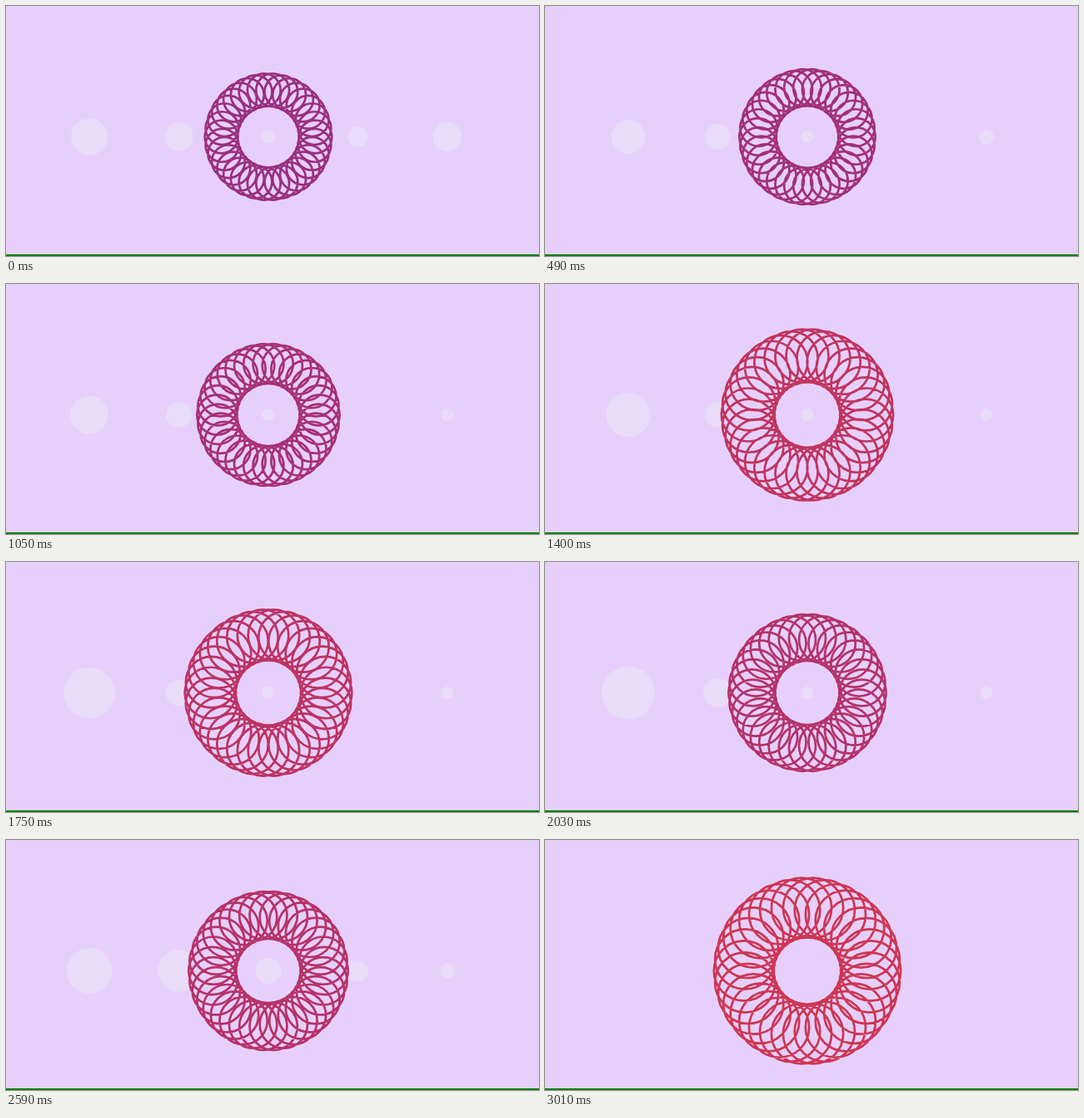
Recreate the animation shown at these times as an HTML page with a canvas. Size 640 by 301 pixels, loop 3.08 s.

```html
<!DOCTYPE html>
<html lang="en">
<head>
<meta charset="utf-8">
<title>Spirograph pulse</title>
<style>
  html, body { margin: 0; width: 100%; height: 100%; overflow: hidden; background: #e6d0fb; }
  canvas { display: block; width: 640px; height: 301px; }
</style>
</head>
<body>
<canvas id="stage" width="640" height="301"></canvas>
<script>
const ctx = document.getElementById('stage').getContext('2d');
const LOOP = 3080, STEP = 70, BEAT = 560, DOTS_END = 3010;
const CX = 315, CY = 157.5, RINGS = 34;
const BG = '#e6d0fb';

// each dot swells once per loop
const dots = [
  { base: 20, rise: 12, peak: 2020, width: 800 },
  { base: 15.2, rise: 10, peak: 2550, width: 420 },
  { base: 7.5, rise: 8.5, peak: 2650, width: 250 },
  { base: 1, rise: 22, peak: 2830, width: 300 },
  { base: 7.5, rise: 10, peak: 0, width: 350 }
];

const mix = (a, b, k) => a + (b - a) * k;

function dotRadius({ base, rise, peak, width }, t) {
  const gap = Math.abs(t - peak);
  const d = Math.min(gap, LOOP - gap) / width;
  return base + rise * Math.exp(-d * d);
}

// a slow swell with a bump on every beat
function ringSize(t) {
  const swell = 16 * (1 - Math.exp(-t / 1200));
  const phase = Math.min(1, (t % BEAT) / 380);
  return 77.5 + swell + 21.5 * Math.sin(Math.PI * phase);
}

function circle(x, y, r) {
  ctx.moveTo(x + r, y);
  ctx.arc(x, y, r, 0, Math.PI * 2);
}

function drawDots(t) {
  ctx.fillStyle = '#e9dcf9';
  ctx.beginPath();
  dots.forEach((dot, i) => circle(100 + i * 107.5, CY, dotRadius(dot, t)));
  ctx.fill();
}

function drawRings(size) {
  const k = (size - 77.5) / 36;
  const outer = size - 1.2, inner = mix(36.5, 40, k);
  const orbit = (outer + inner) / 2, r = (outer - inner) / 2;

  // the band hides the dots behind it
  ctx.fillStyle = BG;
  ctx.beginPath();
  circle(CX, CY, outer);
  circle(CX, CY, inner);
  ctx.fill('evenodd');

  ctx.strokeStyle = `rgb(${mix(154, 205, k)}, ${mix(46, 54, k)}, ${mix(128, 84, k)})`;
  ctx.lineWidth = 2.7;
  ctx.beginPath();
  for (let i = 0; i < RINGS; i++) {
    const a = i / RINGS * Math.PI * 2;
    circle(CX + orbit * Math.cos(a), CY + orbit * Math.sin(a), r);
  }
  ctx.stroke();
}

function draw(now) {
  const t = Math.floor((now % LOOP) / STEP) * STEP;
  ctx.fillStyle = BG;
  ctx.fillRect(0, 0, 640, 301);
  if (t < DOTS_END) drawDots(t);
  drawRings(ringSize(t));
  ctx.fillStyle = '#008000';
  ctx.fillRect(0, 299, 640, 2);
}

let start;
function tick(now) {
  start ??= now;
  draw(Math.max(0, now - start));
  requestAnimationFrame(tick);
}
draw(0);
requestAnimationFrame(tick);
</script>
</body>
</html>
```
